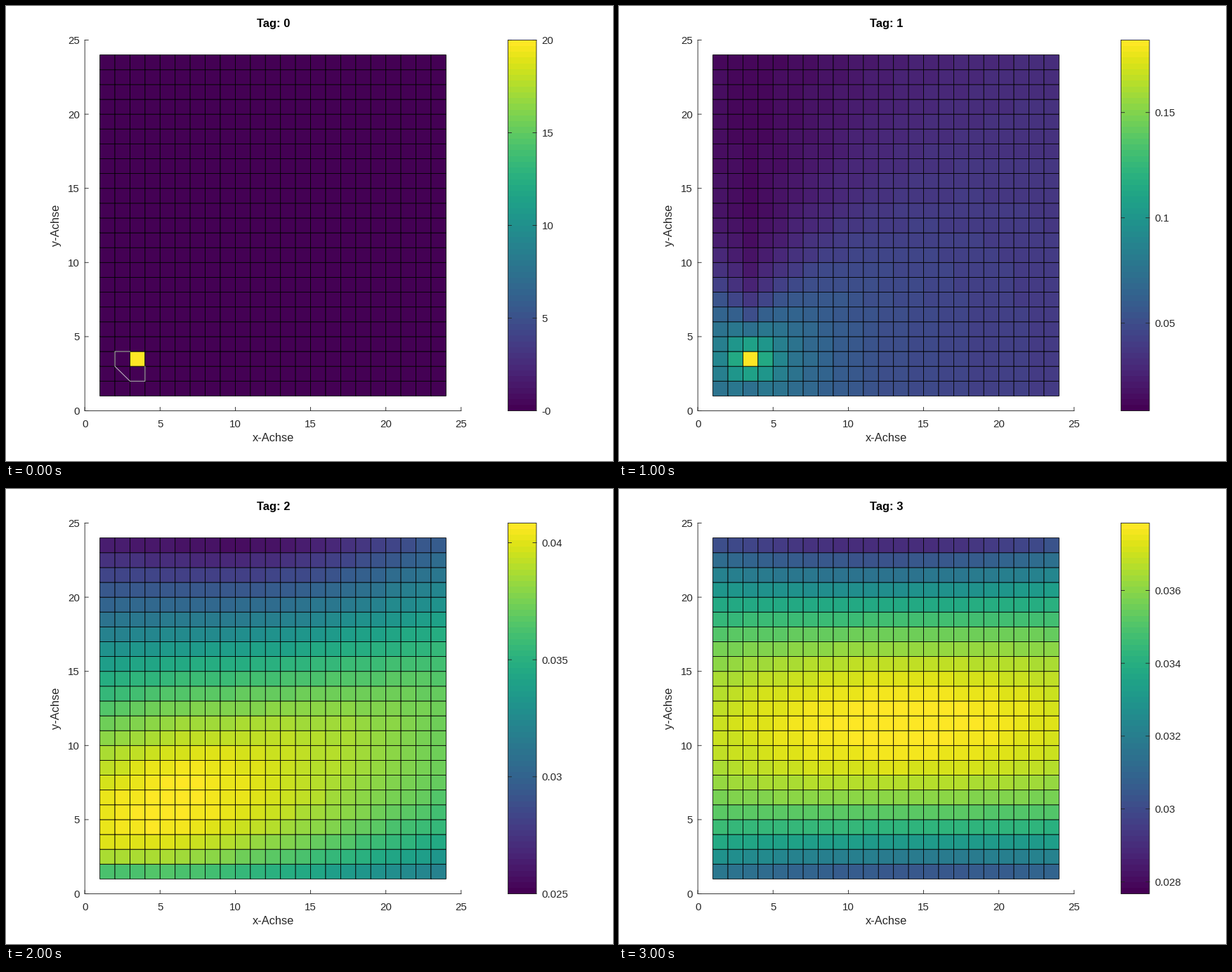
These frames come from a looping animation (864 by 648 pixels, 4000 ms). A matplotlib script:

```python
import numpy as np
import matplotlib.pyplot as plt
from matplotlib.animation import FuncAnimation

WIDTH, HEIGHT = 864, 648
INK = "#262626"
VIRIDIS = plt.get_cmap("viridis", 64)
LEFT, RIGHT, TOP, BOTTOM = 112.2, 647.8, 48.5, 576.5
BAR_LEFT, BAR_RIGHT = 714.5, 755.0
SOURCE = 3
X, Y = np.meshgrid(np.arange(1, 24), np.arange(1, 24))

plt.rcParams["font.family"] = "Liberation Sans"
fig = plt.figure(figsize=(WIDTH / 72, HEIGHT / 72), dpi=72, facecolor="white")
ax = fig.add_axes([0, 0, 1, 1])


def px(x):
    return LEFT + (RIGHT - LEFT) * np.asarray(x) / 25


def py(y):
    return BOTTOM - (BOTTOM - TOP) * np.asarray(y) / 25


def start_field():
    return ((X == SOURCE) & (Y == SOURCE)).astype(float)


def plume_field():
    """Power-law decay from the source, with a shadow above and below it."""
    dx, dy = X - SOURCE, Y - SOURCE
    r = np.maximum(np.hypot(dx, dy), 0.28)
    steepness = 1 - np.abs(dx) / r
    shadow = 2.2 * steepness**2 * (1 - np.exp(-(dy / 6)**2))
    return 0.6 * r**-0.4 * np.exp(-shadow)


def ridge_field():
    """Slanted ridge: steep towards the lower edge, gentler above."""
    crest = 4.3 + 0.3 * X
    height = 1.04 - 0.0143 * np.hypot(X - 5, 3)
    above = np.maximum(Y - crest, 0)
    below = np.maximum(crest - Y, 0) / (crest - 1)
    slope = 0.06 + 0.02 * np.sin(np.pi * X / 24)
    return (height - slope * (np.hypot(above, 5) - 5)
            - (0.26 + 0.0035 * X) * below**3)


def dome_field():
    """Broad dome, almost a band across the whole width."""
    u, d = (X - 13) / 12, Y - 11
    drop = 0.0067 * d**2 * (1 - 0.008 * d)
    tilt = 0.0002 * (X - 12) * d
    return 1 - drop * (1 - 0.27 * u**2) - 0.09 * u**2 + tilt


# Field, colour range and colour bar step of each day
DAYS = [
    (start_field(), 0, 20, 5),
    (plume_field(), 0.0084, 0.1844, 0.05),
    (ridge_field(), 0.025, 0.04084, 0.005),
    (dome_field(), 0.02767, 0.03785, 0.002),
]


def line(xs, ys, color=INK, width=0.9):
    ax.plot(xs, ys, color=color, lw=width, snap=False)


def label(x, y, text, size=15, ha="center", color=INK, **style):
    ax.text(x, y, text, fontsize=size, ha=ha, color=color, **style)


def draw_axes():
    line([LEFT, LEFT, RIGHT], [TOP, BOTTOM, BOTTOM])
    for tick in range(0, 26, 5):
        x, y = px(tick), py(tick)
        line([x, x], [BOTTOM, BOTTOM - 5])
        line([LEFT, LEFT + 5], [y, y])
        label(x, 600, str(tick))
        label(105, y + 5.5, str(tick), ha="right")
    label(380.5, 620, "x-Achse", 16.4)
    label(71.5, 312.5, "y-Achse", 16.4, rotation=90, va="center")


def draw_bar(low, high, step):
    ax.pcolormesh([BAR_LEFT, BAR_RIGHT], np.linspace(BOTTOM, TOP, 65),
                  np.arange(64)[:, None], cmap=VIRIDIS)
    line([BAR_LEFT, BAR_RIGHT, BAR_RIGHT, BAR_LEFT, BAR_LEFT],
         [TOP, TOP, BOTTOM, BOTTOM, TOP])
    first, last = np.ceil(low / step - 1e-9), np.floor(high / step + 1e-9)
    for value in step * np.arange(first, last + 1):
        y = BOTTOM - (value - low) / (high - low) * (BOTTOM - TOP)
        line([BAR_LEFT, BAR_LEFT + 5], [y, y])
        line([BAR_RIGHT - 5, BAR_RIGHT], [y, y])
        label(762.5, y + 5.5, f"{value:.4g}", ha="left")


def draw(day):
    field, low, high, step = DAYS[day]
    ax.clear()
    ax.set(xlim=(0, WIDTH), ylim=(HEIGHT, 0))
    ax.axis("off")
    corners = np.arange(1, 25)
    ax.pcolormesh(px(corners), py(corners), field, cmap=VIRIDIS, vmin=0,
                  vmax=1, edgecolors="black", linewidth=0.8,
                  antialiased=True, snap=False)
    if day == 0:
        line(px([3, 2, 2, 3, 4, 4]), py([4, 4, 3, 2, 2, 3]), "#d0d0d0")
    draw_axes()
    draw_bar(low, high, step)
    label(380.5, 30, f"Tag: {day}", 16.5, weight="bold", color="black")


animation = FuncAnimation(fig, draw, frames=len(DAYS), interval=1000,
                          init_func=lambda: None, repeat=True,
                          repeat_delay=0, blit=False)
plt.show()
```
